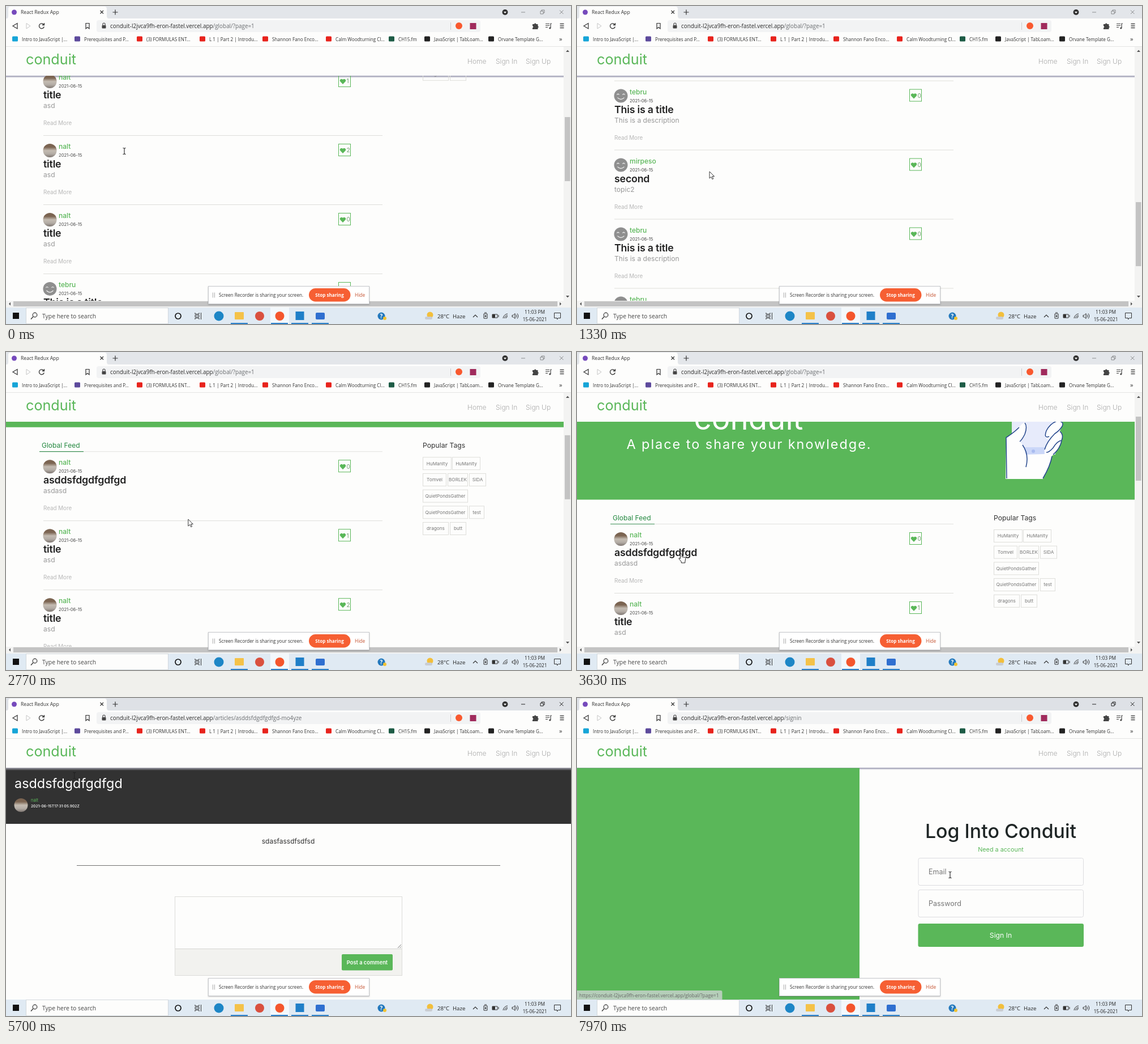
Write an HTML page that moves like this. It is 998 px wide and 561 px high and loops after 8000 ms.

```html
<!DOCTYPE html>
<html lang="en">
<head>
<meta charset="utf-8">
<title>Feed demo</title>
<style>
html, body { margin: 0; width: 100%; height: 100%; overflow: hidden; background: #fdfdfc }
svg { display: block; width: 100vw; height: 100vh }
text { font-family: "Open Sans", "Noto Sans", sans-serif; white-space: pre }
.page text { font-family: Inter, "Open Sans", sans-serif }
</style>
</head>
<body>
<svg id="stage" viewBox="0 0 998 561" preserveAspectRatio="none"></svg>
<script>
const GREEN = '#5ab759', PAPER = '#fdfdfc', INK = '#2b2b2b';
const $ = id => document.getElementById(id);
const rect = (x, y, w, h, fill, more = '') => `<rect x="${x}" y="${y}" width="${w}" height="${h}" fill="${fill}" ${more}/>`;
const disc = (x, y, r, fill, more = '') => `<circle cx="${x}" cy="${y}" r="${r}" fill="${fill}" ${more}/>`;
const line = (d, color, w = 1, more = '') => `<path d="${d}" fill="none" stroke="${color}" stroke-width="${w}" ${more}/>`;
const shape = (d, fill, more = '') => `<path d="${d}" fill="${fill}" ${more}/>`;
const text = (x, y, s, size, fill, more = '') => `<text x="${x}" y="${y}" font-size="${size}" fill="${fill}" ${more}>${s}</text>`;
const group = (id, body, more = '') => `<g id="${id}" ${more}>${body}</g>`;
const MID = 'text-anchor="middle"', MEDIUM = 'font-weight="500"', LIGHT = 'font-weight="300"';

const HOST = 'conduit-l2jvca9fh-eron-fastel.vercel.app';
const GLOBAL = '/global/?page=1';

// ---- page parts
const photo = (x, y) => disc(x, y, 12, 'url(#photo)');
const smiley = (x, y) => disc(x, y, 12, '#8f8f8f') +
  line(`M${x - 7} ${y - 2}q2-3 4 0m6 0q2-3 4 0M${x - 6} ${y + 3}q6 6 12 0`, '#f4f4f4', 1.2);

function post([name, title, about, likes], i) {
  const y = 442 + 122 * i;
  return (name === 'nalt' ? photo : smiley)(77.5, y + 7) +
    text(93, y + 4, name, 12, GREEN, MEDIUM) +
    text(93, y + 18, '2021-06-15', 7.6, '#444') +
    text(66, y + 37, title, 17.8, '#222', 'font-weight="600" letter-spacing="-.2"') +
    text(66, y + 54, about, 12.1, '#999') +
    text(66, y + 84, 'Read More', 9.8, '#b8b8b8') +
    line(`M66 ${y + 102.5}H665`, '#dededa') +
    rect(587.5, y - 4.5, 21, 21, 'none', `stroke="${GREEN}"`) +
    shape(`M595 ${y + 12}l-4.6-4.8a2.7 2.7 0 0 1 4.6-3.2a2.7 2.7 0 0 1 4.6 3.2z`, GREEN) +
    text(601.5, y + 10.3, likes, 10, '#6f9d70');
}

const again = ['tebru', 'This is a title', 'This is a description', 0];
const posts = [
  ['nalt', 'asddsfdgdfgdfgd', 'asdasd', 0],
  ...[1, 2, 0].map(n => ['nalt', 'title', 'asd', n]),
  again, again, again,
  ['mirpeso', 'second', 'topic2', 0],
  again, again
];

const tag = (x, w, row, s) => rect(x + .5, 432.5 + 28.7 * row, w, 22, 'none', 'stroke="#dededa"') +
  text(x + w / 2 + .5, 446.3 + 28.7 * row, s, 8.2, '#777', MID);
const tags = tag(736, 50, 0, 'HuManIty') + tag(788, 49, 0, 'HuManIty') +
  tag(736, 41, 1, 'Tomvel') + tag(780, 35, 1, 'BORLEK') + tag(818, 29, 1, 'SIDA') +
  tag(736, 79, 2, 'QuietPondsGather') +
  tag(736, 79, 3, 'QuietPondsGather') + tag(818, 26, 3, 'test') +
  tag(736, 45, 4, 'dragons') + tag(784, 28, 4, 'butt');

const NAVY = '#24468c';
const phone =
  rect(768, 166, 77, 134, '#e7ebfb') + rect(768, 166, 77, 14, '#cbd7f8') + rect(768, 287, 77, 13, '#cbd7f8') +
  line('M800 173h12', NAVY, 1.5) + rect(777, 193, 59, 24, '#f4f6fe') +
  disc(788, 205, 6.5, '#ef929b') + disc(806, 294, 3, '#a9bcf0') +
  line('M851 164q6 7 13-1', '#b9d6e8', 1.4) +
  disc(875, 166, 5, 'none', 'stroke="#b9d6e8" stroke-width="1.3"') +
  line('M862 178a3.2 3.2 0 1 0 0 4', '#b9d6e8', 1.3) +
  shape('M757 343L758 270Q772 261 781 252Q787 243 792 243Q796 250 791 264Q785 276 783 278Q790 284 793 300L826 299Q824 286 834 274Q824 272 829 258Q834 248 846 240L845 226Q855 214 863 207Q868 207 865 216Q862 226 852 239Q860 242 857 250L853 258Q860 264 856 274Q854 286 846 296Q842 301 839 302Q837 320 823 343z', '#fefefe') +
  line('M759 342L758 270Q772 261 781 252M791 244Q796 250 791 264Q786 274 782 277M787 283Q799 300 793 322M845 230Q854 216 863 207Q868 207 865 216Q861 228 847 241M847 241Q835 246 829 258Q824 272 834 268M853 241Q860 243 857 250Q852 258 844 263Q830 277 826 291M853 259Q860 265 856 275Q848 276 841 288Q833 297 829 296M856 276Q853 290 841 300M839 303Q836 320 823 342', NAVY, 1.5);

const hero = rect(0, 123.5, 998, 256, GREEN) +
  text(303, 256, 'conduit', 54.6, '#fff', MID) +
  text(304, 290, 'A place to share your knowledge.', 23.5, '#fff', MID + ' letter-spacing="1.95"') + phone;

const feedTab = text(63, 415.5, 'Global Feed', 12, '#23883f') + line('M59 422.5H137', '#3c8f55', 1.2);

const feed = group('scroller', hero + feedTab + line('M137 422.5H665', '#e2e2df') +
  posts.map(post).join('') + text(736, 415.5, 'Popular Tags', 12.2, '#333') + tags);

const loading = hero + feedTab + text(745, 415.5, 'Popular Tags', 12.2, '#333') +
  text(745, 444.5, 'Loading...', 12, '#333') +
  group('spinner', line('M34.5 0A34.5 34.5 0 0 1 0 34.5', GREEN, 3.5));

const article = rect(0, 124, 998, 98, '#323232') + rect(0, 123, 998, 5, 'url(#glow)') +
  text(15, 158.5, 'asddsfdgdfgdfgd', 23.4, '#fff') + photo(26.5, 189) +
  text(44, 182.5, 'nalt', 7.5, GREEN) +
  text(44, 192.7, '2021-06-15T17:31:05.902Z', 6.7, '#fff', MEDIUM) +
  text(498.5, 256.5, 'sdasfassdfsdfsd', 12, '#333', MID) +
  line('M125 295.5H873', '#707070') +
  rect(298.5, 350.5, 401, 139, PAPER, 'stroke="#dcdcd9"') +
  rect(299, 443, 400, 46, '#f2f2ef') + line('M299 442.5H699', '#d5d5d2') +
  line('M692 441l6-6m-2.5 6l2.5-2.5', '#777') +
  rect(593, 452, 90, 28.5, GREEN, 'rx="2"') +
  text(638, 469.5, 'Post a comment', 9.3, '#fff', MID + ' font-weight="600"');

const field = (y, s) => rect(603, y + .5, 291.5, 48, PAPER, 'rx="3" stroke="#dcdce0"') + text(621, y + 29, s, 12.5, '#777');
const signin = rect(0, 123.5, 499, 408.5, GREEN) +
  text(748.5, 247, 'Log Into Conduit', 33.9, '#1f2626', MID + ' ' + MEDIUM) +
  text(748.5, 270.5, 'Need a account', 10.8, GREEN, MID) +
  field(282, 'Email') + field(338, 'Password') +
  rect(602.5, 398, 292.5, 41, GREEN, 'rx="3"') + text(748.5, 422.5, 'Sign In', 12.2, '#fff', MID);

const header = rect(0, 72, 998, 51, PAPER) + text(35, 103, 'conduit', 25.2, GREEN) +
  text(815, 102, 'Home', 12, '#aaa', LIGHT) + text(865, 102, 'Sign In', 12, '#aaa', LIGHT) +
  text(918, 102, 'Sign Up', 12, '#aaa', LIGHT);

const bars = rect(985, 72, 13, 448, '#f3f3f2') + rect(0, 520, 998, 12, '#f3f3f2') +
  rect(13, 521, 961, 9, '#c3c3c3') +
  shape('M989 81h6l-3-3.5zM989 511h6l-3 3.5zM8 522.5v6l-3-3zM978 522.5v6l3-3z', '#555') +
  rect(987, 0, 9.5, 113, '#c3c3c3', 'id="thumb"');

// ---- browser window
const marks = [
  [28, 'Intro to JavaScript |...', '#16a5d8'], [138, 'Prerequisites and P...', '#5d4a9c'],
  [248, '(3) FORMULAS ENT...', '#e8231c'], [359, 'L 1 | Part 2 | Introdu...', '#e8231c'],
  [470, 'Shannon Fano Enco...', '#e8231c'], [582, 'Calm Woodturning Cl...', '#e8231c'],
  [693, 'CH15.fm', '#1d5b45'], [756, 'JavaScript | TabLoam...', '#222'], [869, 'Orvane Template G...', '#222']
];
const browser = rect(0, 0, 998, 22, '#dee1e6', 'id="strip"') +
  shape('M2 22Q4 21 4 18V5Q4 1 8 1H174Q178 1 178 5V18Q178 21 181 22z', PAPER) +
  disc(14.5, 11, 4.5, '#764abc') + text(26, 14, 'React Redux App', 8.6, '#333') +
  line('M166.5 8l5.5 5.5m0-5.5l-5.5 5.5M188.5 11h9m-4.5-4.5v9', '#333', 1.2) +
  disc(881.5, 11, 5, '#333') + shape('M879 10h5l-2.5 3z', '#fff') +
  group('controls', line('M910 11h7M944 9h5v5h-5zM946 9v-2h5v5h-2M978 7.5l6.5 6.5m0-6.5l-6.5 6.5', '#222')) +
  rect(0, 22, 998, 50, PAPER) + rect(160, 25, 678, 21, '#f2f3f4', 'rx="4"') +
  line('M20 30.5v9.5l-8-4.7z', '#333', 1.2) + line('M36 30.5v9.5l7-4.7z', '#c5c5c5') +
  line('M66.5 32.5a4.5 4.5 0 1 0 .8 4M67.5 30v3.5h-3.5', '#333', 1.3) +
  line('M141 30.5h6v9.5l-3-2.5l-3 2.5z', '#333', 1.2) +
  rect(169.5, 34, 7, 5.5, '#444', 'rx="1"') + line('M171 34v-2a2 2 0 0 1 4 0v2', '#444', 1.2) +
  text(184, 39, `${HOST}<tspan id="path" fill="#6a6d70"></tspan>`, 9.9, INK) +
  line('M785.5 29v13', '#ccc') + disc(800, 35, 6, '#f9592f') + rect(819.5, 30, 11, 11, '#a02a5c') +
  shape('M930 32h3a1.8 1.8 0 0 1 3.5 0h3v3.2a1.8 1.8 0 0 1 0 3.4v2.4h-9.5v-2.5a1.7 1.7 0 0 0 0-3.3z', '#444') +
  line('M953 31.5h7m-7 3h7m-7 3h4M962 39v-8h2', '#444', 1.2) + disc(960.8, 39, 1.6, '#444') +
  line('M978.5 31.5h7m-7 3.5h7m-7 3.5h7', '#444', 1.3) +
  marks.map(([x, s, color]) => rect(x - 17, 53.5, 10, 9, color, 'rx="1.5"') + text(x, 61.5, s, 8.15, '#333')).join('') +
  text(977, 62, '»', 11, '#333') + line('M0 71.5H998', '#e4e4e4');

const status = rect(-3, 516, 259.5, 18, '#d3d6da', 'rx="3" opacity=".75"') +
  text(4, 527.5, 'https://' + HOST + GLOBAL, 8.45, '#666');

const sharing = rect(357.5, 494.5, 284, 31, '#fff', 'stroke="#c6c8cc" filter="url(#soft)"') +
  line('M365.5 505.5v9m3-9v9', '#aaa') +
  text(376, 513, 'Screen Recorder is sharing your screen.', 8.15, '#333') +
  rect(535, 498, 73.5, 23.5, '#f65f33', 'rx="11.7"') +
  text(571.5, 513, 'Stop sharing', 8.1, '#fff', MID + ' font-weight="700"') + text(616, 513, 'Hide', 8.4, '#c4512f');

const taskbar = rect(0, 532, 998, 29, '#e0eaf3') + rect(12, 541, 11, 11, '#111') +
  rect(35.5, 532.5, 251, 28, PAPER, 'stroke="#d2d8dd"') +
  disc(51, 545, 3.8, 'none', 'stroke="#333" stroke-width="1.2"') + line('M48 548l-4 4.5', '#333', 1.3) +
  text(64, 550.5, 'Type here to search', 10.4, '#444') +
  disc(304, 547, 5, 'none', 'stroke="#111" stroke-width="1.7"') +
  line('M334 541v2.5h7v-2.5M334 553v-2.5h7v2.5M334 545.5h7v3h-7zM344.5 541v12', '#333') +
  rect(467, 532, 33, 29, '#f3f8fc') +
  disc(376, 547, 8.5, '#1d86c6') + rect(404, 540, 16, 13, '#f4c249', 'rx="1"') + disc(448, 547, 8, '#d9503f') +
  disc(483.5, 547, 8, '#f4562d') + rect(511.5, 539, 15, 15, '#1f7fc8') + rect(547, 541, 16, 12, '#2f6fd0', 'rx="2"') +
  [397, 468, 504, 540].map(x => rect(x, 559, 30, 2, '#2a7fc9')).join('') +
  disc(663, 547, 6.5, '#2379bd') + text(663, 551, '?', 10, '#fff', MID + ' font-weight="700"') + disc(669, 551, 3, '#f2c230') +
  disc(749, 545, 5.5, '#f2bf3c') + rect(740, 548, 13, 5, '#c9cdd3', 'rx="2.5"') +
  text(762, 550.5, '28°C', 9.6, '#222') + text(789, 550.5, 'Haze', 9.6, '#222') +
  line('M825 549l4-4l4 4', '#333', 1.2) +
  line('M844 543h6v8h-6zM845 541h4M859 544h9v6h-9zM870 545v4M878 551a9 9 0 0 1 8-8M880.5 551a6 6 0 0 1 5.5-5M883 551a3 3 0 0 1 3-3M894 545.5h2l3-3v9l-3-3h-2zM901 544.5q2 2.5 0 5m2-7q3.5 4.5 0 9', '#333') +
  disc(847, 547, 1.5, '#333') + rect(859, 544, 5, 6, '#333') +
  text(934, 543, '11:03 PM', 8.3, '#222', MID) + text(934, 556, '15-06-2021', 8.2, '#222', MID) +
  line('M968.5 541.5h11v9h-4l-2 2.5v-2.5h-5z', '#333');

const cursors =
  group('arrow', shape('M0 0v12l2.9-2.6l2 4.2l1.9-.9l-2-4.1h3.7z', '#fff', 'stroke="#222" stroke-width=".9"')) +
  group('beam', line('M-2.5-5.5q2.5 0 2.5 1.5q0-1.5 2.5-1.5M0-4.5v9M-2.5 5.5q2.5 0 2.5-1.5q0 1.5 2.5 1.5', '#222', 1.1)) +
  group('hand', shape('M-1.5 1.3a1.4 1.4 0 0 1 2.8 0v4l5.5 1.2q1.2.5 1 2l-1 5.5v2h-6.5v-2l-4-5q-.8-2 1-1.5l1.2 1.2z', '#fff', 'stroke="#222"'));

$('stage').innerHTML = `<defs>
  <linearGradient id="photo" x2="0" y2="1"><stop offset=".25" stop-color="#7b6451"/><stop offset=".5" stop-color="#c4bcb2"/>
    <stop offset=".75" stop-color="#b3aca5"/><stop offset="1" stop-color="#7d7570"/></linearGradient>
  <linearGradient id="glow" x2="0" y2="1"><stop stop-color="#a5a5b0"/><stop offset="1" stop-color="#323232"/></linearGradient>
  <linearGradient id="shade" x2="0" y2="1"><stop stop-color="#9191aa"/><stop offset="1" stop-color="#9191aa" stop-opacity="0"/></linearGradient>
  <filter id="soft"><feDropShadow dx="0" dy="1" stdDeviation="1" flood-opacity=".25"/></filter></defs>` +
  rect(0, 0, 998, 561, PAPER) + rect(0, 123, 998, 4, 'url(#shade)') +
  `<g class="page">` + group('feed', feed) + group('loading', loading) + group('article', article) +
  group('signin', signin) + header + '</g>' + group('bars', bars) + browser +
  group('status', status) + sharing + taskbar + group('cursor', cursors);

// ---- motion: rows of [time, values...]
const scrollKeys = [[200, 438], [1330, 1022], [1620, 1150], [1850, 1150], [2770, 247], [3350, 119]];
const cursorKeys = [
  [200, 209, 256], [1330, 234, 292], [2770, 322, 295], [3550, 184, 356], [4430, 184, 356],
  [4800, 324, 300], [5370, 324, 300], [5700, 121, 137], [5950, 82, 97], [6240, 82, 97],
  [6570, 853, 75], [6950, 884, 97], [7430, 884, 97], [7950, 659, 312]
];
const cursorKinds = [[0, 'beam'], [260, 'arrow'], [3450, 'hand'], [4600, 'arrow'], [5560, 'beam'],
  [5860, 'hand'], [6300, 'arrow'], [6900, 'hand'], [7430, 'arrow'], [7830, 'beam']];
const views = [[0, 'feed'], [4600, 'article'], [6250, 'loading'], [7100, 'feed'], [7430, 'signin']];
const paths = { feed: GLOBAL, loading: GLOBAL, article: '/articles/asddsfdgdfgdfgd-mo4yze', signin: '/signin' };

function at(keys, t) {
  const i = keys.findIndex(k => k[0] > t);
  if (i < 1) return (i ? keys[keys.length - 1] : keys[0]).slice(1);
  const a = keys[i - 1], b = keys[i], p = (t - a[0]) / (b[0] - a[0]);
  return a.slice(1).map((v, j) => v + (b[j + 1] - v) * p);
}
const pick = (list, t) => list.filter(e => e[0] <= t).pop()[1];
const show = (id, on) => $(id).style.display = on ? '' : 'none';

function draw(t) {
  const view = pick(views, t), kind = pick(cursorKinds, t), active = t >= 4300;
  for (const id in paths) show(id, id === view);
  for (const id of ['arrow', 'beam', 'hand']) show(id, id === kind);
  show('bars', view === 'feed');
  show('status', t >= 5900);
  $('path').textContent = paths[view];
  $('strip').setAttribute('fill', active ? '#dee1e6' : '#e3e6ea');
  $('controls').setAttribute('opacity', active ? 1 : .45);
  const scroll = t < 4600 ? at(scrollKeys, t)[0] : 0;
  $('scroller').setAttribute('transform', `translate(0 ${-scroll})`);
  $('thumb').setAttribute('y', 83.5 + scroll * .2567);
  $('spinner').setAttribute('transform', `translate(362 492) rotate(${(t - 6570) * .36 - 20})`);
  $('cursor').setAttribute('transform', `translate(${at(cursorKeys, t)})`);
}

const start = performance.now();
function tick() {
  draw((performance.now() - start) % 8000);
  requestAnimationFrame(tick);
}
tick();
</script>
</body>
</html>
```
